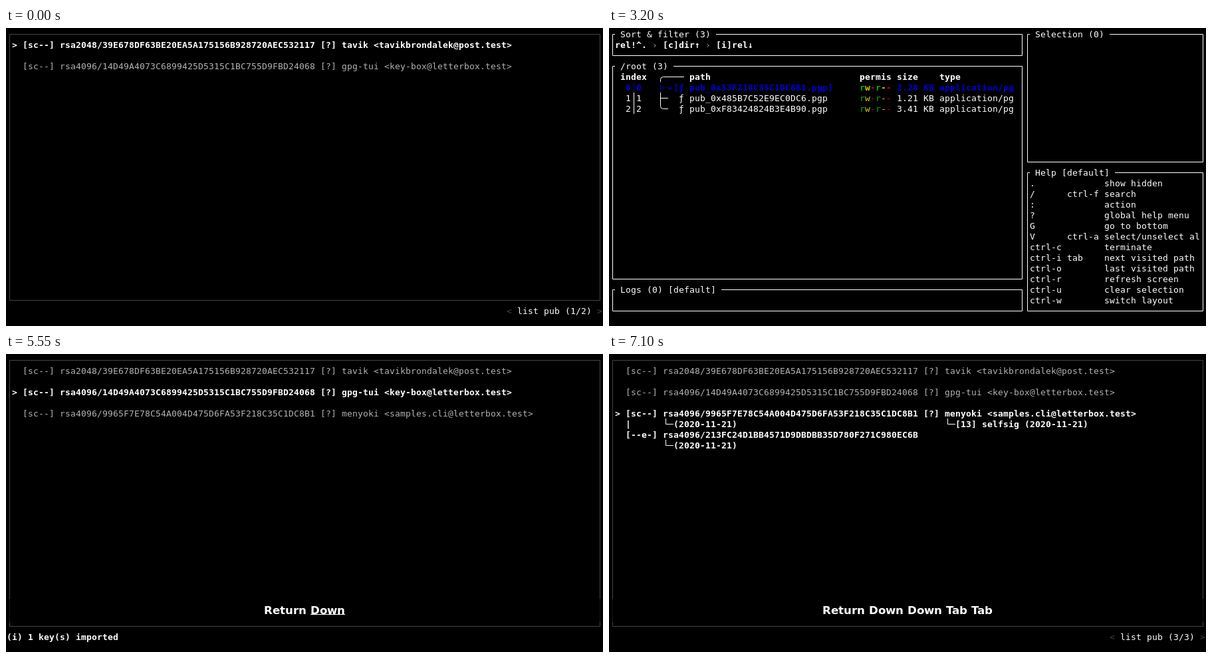
Write an HTML page that moves like this. It is 898 by 448 pixels and loops after 8 s.

```html
<!DOCTYPE html>
<html lang="en">
<head>
<meta charset="utf-8">
<title>Importing a key</title>
<style>
  html, body { margin: 0; width: 100%; height: 100%; overflow: hidden; background: #000; }
  svg { display: block; width: 898px; height: 448px; }
  text { font: 13px "DejaVu Sans Mono", monospace; fill: #fff; white-space: pre; }
  path { fill: none; stroke: #fff; }
  .bold { font-weight: bold; }
  .dim { fill: #b2b2b2; }
  .faint { fill: #444; }
  .sep { fill: #999; }
  .frame { stroke: #444; }
  .blue { fill: #0000cd; }
  .blueline { stroke: #00009a; }
  .red { fill: #cd0000; }
  .green { fill: #00b400; }
  .yellow { fill: #cdcd00; }
  .keys { font: bold 16.667px "DejaVu Sans", sans-serif; }
  .timed { animation: 8s step-end infinite; }
</style>
</head>
<body>
<svg viewBox="0 0 898 448" id="stage"></svg>
<script>
const LOOP = 8000, CELL_W = 8, CELL_H = 16;
const stage = document.getElementById('stage');
const sheet = document.head.appendChild(document.createElement('style')).sheet;
const left = col => 1 + col * CELL_W;
const midX = col => left(col) + 4.5;
const midY = row => row * CELL_H + 9.5;
let ruleCount = 0;

function add(parent, tag, attrs = {}, content = '') {
  const el = document.createElementNS('http://www.w3.org/2000/svg', tag);
  for (const name in attrs) el.setAttribute(name, attrs[name]);
  el.textContent = content;
  return parent.appendChild(el);
}

// Group that is visible only inside the given [from, to] windows.
function timed(parent, ...windows) {
  const name = 'show' + ruleCount++;
  const stops = windows.map(([from, to]) =>
    `${from / LOOP * 100}% { opacity: 1 } ${to / LOOP * 100}% { opacity: 0 }`);
  sheet.insertRule(`@keyframes ${name} { 0% { opacity: 0 } ${stops.join(' ')} }`);
  const group = add(parent, 'g', { class: 'timed' });
  group.style.animationName = name;
  return group;
}

// Text on the terminal's character grid.
function put(parent, col, row, str, cls = '') {
  const x = [...str].map((_, i) => left(col + i)).join(' ');
  add(parent, 'text', { x, y: row * CELL_H + 14, class: cls }, str);
}

const line = (parent, d, cls = '') => add(parent, 'path', { d, class: cls });

function panel(parent, c0, r0, c1, r1, title) {
  put(parent, c0 + 2, r0, title);
  line(parent, `M${left(c0 + title.length + 3)} ${midY(r0)}H${midX(c1)}V${midY(r1)}` +
    `H${midX(c0)}V${midY(r0)}H${left(c0 + 1)}`);
}

const branch = (parent, col, row) =>
  line(parent, `M${midX(col)} ${row * CELL_H + 1}V${midY(row)}H${left(col + 2)}`);

function status(parent, count) {
  put(parent, 94, 26, '<', 'faint');
  put(parent, 96, 26, `list pub (${count})`);
  put(parent, 111, 26, '>', 'faint');
}

// Key list
const list = timed(stage, [0, 1550], [3900, LOOP]);
line(list, `M${midX(0)} ${midY(0)}H${midX(111)}V${midY(25)}H${midX(0)}Z`, 'frame');

function key(row, str, active, idle) {
  const on = timed(list, active);
  put(on, 1, row, '>', 'bold');
  put(on, 3, row, str, 'bold');
  put(timed(list, ...idle), 3, row, str, 'dim');
}
key(1, '[sc--] rsa2048/39E678DF63BE20EA5A175156B928720AEC532117 [?] tavik <tavikbrondalek@post.test>',
  [0, 5550], [[5550, LOOP]]);
key(3, '[sc--] rsa4096/14D49A4073C6899425D5315C1BC755D9FBD24068 [?] gpg-tui <key-box@letterbox.test>',
  [5550, 5700], [[0, 5550], [5700, LOOP]]);
key(5, '[sc--] rsa4096/9965F7E78C54A004D475D6FA53F218C35C1DC8B1 [?] menyoki <samples.cli@letterbox.test>',
  [5700, LOOP], [[3950, 5700]]);

const subkeys = timed(list, [6350, LOOP]);
put(subkeys, 3, 6, '|', 'bold');
put(subkeys, 3, 7, '[--e-] rsa4096/213FC24D1BB4571D9DBDBB35D780F271C980EC6B', 'bold');
for (const row of [6, 8]) {
  branch(subkeys, 10, row);
  put(subkeys, 12, row, '(2020-11-21)', 'bold');
}
const selfsig = timed(list, [6950, LOOP]);
branch(selfsig, 63, 6);
put(selfsig, 65, 6, '[13] selfsig (2020-11-21)', 'bold');

status(timed(list, [0, 3950]), '1/2');
put(timed(list, [3950, 5900]), 0, 26, '(i) 1 key(s) imported', 'bold');
status(timed(list, [5900, LOOP]), '3/3');

// File explorer
const files = timed(stage, [1550, 3900]);
panel(files, 0, 0, 77, 2, 'Sort & filter (3)');
panel(files, 0, 3, 77, 23, '/root (3)');
panel(files, 0, 24, 77, 26, 'Logs (0) [default]');
panel(files, 78, 0, 111, 12, 'Selection (0)');
panel(files, 78, 13, 111, 26, 'Help [default]');

put(files, 1, 1, 'rel!^.', 'bold');
put(files, 10, 1, '[c]dir↑', 'bold');
put(files, 20, 1, '[i]rel↓', 'bold');
put(files, 8, 1, '›', 'sep');
put(files, 18, 1, '›', 'sep');

[[2, 'index'], [15, 'path'], [47, 'permis'], [54, 'size'], [62, 'type']]
  .forEach(([col, str]) => put(files, col, 4, str, 'bold'));
line(files, 'M77.5 81V77.5Q77.5 73.5 81.5 73.5H113');

[['53F218C35C1DC8B1', '2.28'], ['485B7C52E9EC0DC6', '1.21'], ['F83424824B3E4B90', '3.41']]
  .forEach(([id, size], i) => {
    const row = 5 + i, top = row * CELL_H + 1, y = midY(row);
    const cls = i ? '' : 'bold blue', stroke = i ? '' : 'blueline';
    put(files, 3, row, String(i), cls);
    put(files, 5, row, String(i), cls);
    line(files, `M37.5 ${top}v16`, stroke);
    line(files, i < 2 ? `M77.5 ${top}v16M77.5 ${y}H89` : `M77.5 ${top}V${y - 4}q0 4 4 4H89`, stroke);
    put(files, 13, row, `ƒ pub_0x${id}.pgp`, cls);
    if (!i) {
      put(files, 11, row, '▸[', cls);
      put(files, 41, row, ']', cls);
    }
    [...'rw-r--'].forEach((ch, n) =>
      put(files, 47 + n, row, ch, ['green', 'yellow', 'red'][n % 3] + (i ? '' : ' bold')));
    put(files, 54, row, size + ' KB', cls);
    put(files, 62, row, 'application/pg', cls);
  });

[['.', '', 'show hidden'], ['/', 'ctrl-f', 'search'], [':', '', 'action'],
 ['?', '', 'global help menu'], ['G', '', 'go to bottom'], ['V', 'ctrl-a', 'select/unselect al'],
 ['ctrl-c', '', 'terminate'], ['ctrl-i', 'tab', 'next visited path'],
 ['ctrl-o', '', 'last visited path'], ['ctrl-r', '', 'refresh screen'],
 ['ctrl-u', '', 'clear selection'], ['ctrl-w', '', 'switch layout']]
  .forEach((cells, i) => cells.forEach((str, n) => put(files, 79 + 7 * n, 14 + i, str)));

// Pressed keys; the newest one is underlined for 200 ms.
const overlay = timed(stage, [1500, 3200], [3850, LOOP]);
add(overlay, 'rect', { y: 368, width: 898, height: 35, 'fill-opacity': 0.7 });

// Centred label with whole-pixel glyph advances.
function press(str, from, to) {
  const group = timed(overlay, [from, to]);
  const label = add(group, 'text', { x: 0, y: 391, class: 'keys' }, str);
  const edges = [0];
  for (let i = 0; i < str.length; i++) {
    const next = i + 1 < str.length ? label.getStartPositionOfChar(i + 1) : label.getEndPositionOfChar(i);
    edges.push(edges[i] + Math.round(next.x - label.getStartPositionOfChar(i).x));
  }
  const width = edges[str.length], origin = 449 - width / 2;
  label.setAttribute('x', edges.slice(0, -1).map(x => origin + x).join(' '));

  const last = edges[str.lastIndexOf(' ') + 1];
  const mark = timed(group, [from, Math.min(from + 200, to)]);
  add(mark, 'rect', { x: origin + last, y: 391, width: width - last, height: 1, fill: '#fff' });
}
press('i', 1500, 3200);
press('Return', 3850, 5550);
press('Return Down', 5550, 5700);
press('Return Down Down', 5700, 6300);
press('Return Down Down Tab', 6300, 6900);
press('Return Down Down Tab Tab', 6900, LOOP);
</script>
</body>
</html>
```
